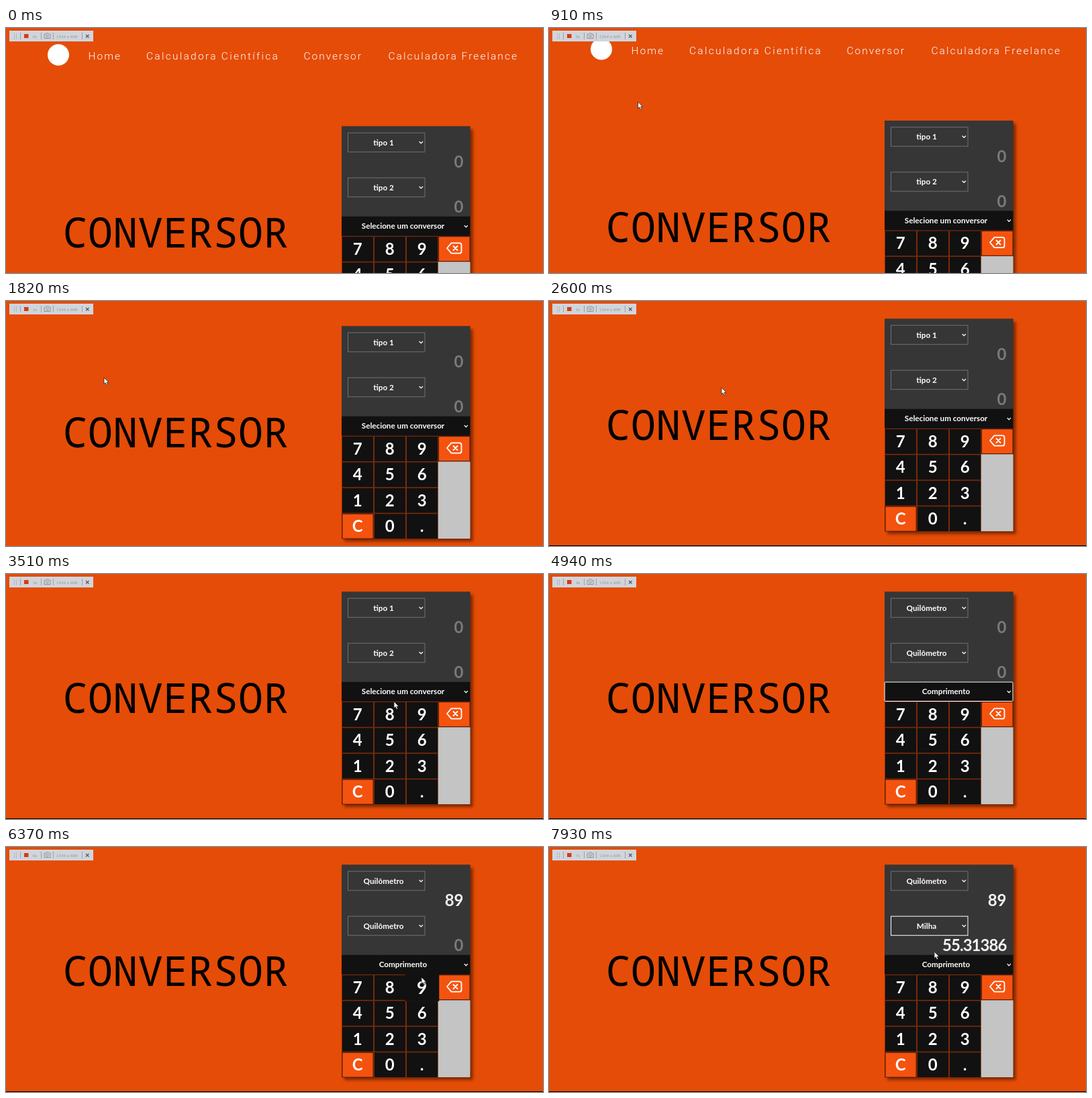
Animation, 800 px wide and 365 px high, one loop 8 s. Source, as an HTML page:

```html
<!DOCTYPE html>
<html lang="pt">
<head>
<meta charset="utf-8">
<title>Conversor</title>
<style>
  html, body { margin: 0; width: 100%; height: 100%; overflow: hidden; background: #e54c07; }
  svg { display: block; width: 800px; height: 365px; }
  text { font-family: Lato, sans-serif; font-weight: 700; fill: #fff; }
  .mid { text-anchor: middle; }
  .label { font-size: 11.7px; }
  .value { font-size: 24px; text-anchor: end; }
  .key { font-size: 24px; }
  .nav { font: 300 15.5px Roboto, sans-serif; }
  .title { font: 500 61.5px "Noto Sans Mono", "DejaVu Sans Mono", monospace; letter-spacing: .45px; fill: #000; }
  .bar text { font: 7px "Liberation Serif", serif; fill: #8d9097; }
  .line { fill: none; stroke: #fff; stroke-linecap: round; stroke-linejoin: round; }
  .shadow { filter: blur(2px); }
</style>
</head>
<body>
<svg id="stage" viewBox="0 0 800 365">
  <rect width="800" height="365" fill="#e54c07"/>
  <g id="page"></g>
  <g class="bar">
    <rect x="5" y="4" width="125" height="16" fill="#d0d5dc"/>
    <path d="M12.5 9v8M15.5 9v8" stroke="#8d9097" stroke-dasharray="1 1.5"/>
    <path d="M21.5 7v10M52.5 7v10M70.5 7v10M113.5 7v10" stroke="#9da1a8"/>
    <rect x="27" y="9" width="6.5" height="6" fill="#d93a12"/>
    <text id="clock" x="40" y="14.5">0s</text>
    <path d="M57 9.5h2l1-1.5h3l1 1.5h2v6h-9z" fill="none" stroke="#8d9097"/>
    <circle cx="61.5" cy="12.3" r="1.7" fill="none" stroke="#8d9097"/>
    <text x="75" y="14.5">1334 x 609</text>
    <path d="M119 10l4.5 4.5M123.5 10l-4.5 4.5" stroke="#55585e" stroke-width="1.2"/>
  </g>
  <path id="cursor" d="M0 0v9.8l2.2-2 1.7 3.7 1.8-.8-1.7-3.5h3.1z" fill="#fff" stroke="#222" stroke-width=".8"/>
</svg>
<script>
const LOOP = 8000, STEP = 130;
const EDGE = '#707070', ORANGE = '#f4530f';
const $ = id => document.getElementById(id);
const page = $('page');

function add(tag, attrs, parent = page) {
  const el = document.createElementNS('http://www.w3.org/2000/svg', tag);
  for (const k in attrs) el.setAttribute(k, attrs[k]);
  parent.appendChild(el);
  return el;
}
function box(x, y, width, height, fill, more, parent) {
  return add('rect', { x, y, width, height, fill, ...more }, parent);
}
function write(str, x, y, cls, parent) {
  const el = add('text', { x, y, class: cls }, parent);
  el.textContent = str;
  return el;
}

// Menu entry whose tracking fills its span
function entry(str, x, span) {
  const el = write(str, x, 47, 'nav');
  const gap = (span - el.getComputedTextLength()) / (str.length - 1);
  el.style.letterSpacing = gap + 'px';
}

// Header and title
add('circle', { cx: 78, cy: 40, r: 16, fill: '#fff' });
entry('Home', 122.5, 47.5);
entry('Calculadora Científica', 209, 195.5);
entry('Conversor', 443.5, 85.5);
entry('Calculadora Freelance', 569.5, 191.5);
write('CONVERSOR', 84.6, 327, 'title');
box(0, 484, 800, 60, '#000');

// Calculator
const chevron = (x, y) =>
  add('path', { d: `M${x - 2.3} ${y - 1.2}l2.3 2.4 2.3-2.4`, class: 'line', 'stroke-width': 1.3 });

box(504, 151, 191.5, 316, '#5a1c00', { class: 'shadow', opacity: .75 });
box(500, 146.5, 191.5, 316.5, '#7b2a0a');
box(500, 146.5, 191.5, 134.5, '#363636');

function unit(y, name) {
  const frame = box(509.5, y, 114.5, 28.5, 'none', { stroke: EDGE });
  const label = write(name, 562.5, y + 18.3, 'mid label');
  chevron(618.3, y + 14.5);
  const value = write('0', 681.5, y + 52, 'value');
  return { frame, label, value };
}
const from = unit(156.2, 'tipo 1'), to = unit(223.2, 'tipo 2');

box(500, 280.8, 191.5, 29, '#111');
const kind = write('Selecione um conversor', 591.5, 299.2, 'mid label');
chevron(685.3, 295.6);
const ring = box(500, 281, 191, 28.5, 'none', { stroke: '#fff', rx: 1 });

const dark = { stroke: '#3a1205', 'stroke-width': .8 };
box(643.8, 348.3, 47.7, 114.7, '#c4c4c4');
box(644.6, 310.8, 46.4, 36.8, ORANGE, dark);
add('path', { d: 'M657 328l6.5-7.7h12q3 0 3 3v9.4q0 3-3 3h-12z', class: 'line', 'stroke-width': 1.8 });
add('path', { d: 'M666.5 325l6 6m0-6l-6 6', class: 'line', 'stroke-width': 1.9 });

const pad = add('g', {});
const keys = [...'789456123C0.'].map((ch, i) => {
  const x = 501 + i % 3 * 48, y = 311 + Math.floor(i / 3) * 38.4;
  const el = add('g', {}, pad);
  if (ch === 'C') box(x, y, 46, 36.8, ORANGE, dark, el);
  else box(x, y, 46, 36.8, '#111', {}, el);
  write(ch, x + 22.7, y + 26.8, 'mid key', el);
  return { el, x, y };
});

// Motion: [time, values...]
const scrollPath = [[780, 0], [910, 8.5], [1300, 56], [1820, 109], [1950, 117], [2080, 120]];
const cursorPath = [
  [130, 40, 25], [780, 132, 108], [910, 132.5, 110], [1820, 146, 114], [2340, 146, 114],
  [3120, 574, 172], [3380, 576, 182], [3510, 578, 190], [4160, 578, 190], [4420, 590, 178],
  [5070, 600, 178], [5460, 574, 196], [6110, 574, 196], [6240, 616, 195], [6370, 619, 194],
  [6500, 619, 194], [6630, 612, 180], [7150, 570, 122], [7800, 574, 152], [7930, 574, 156]
];
const shown = [[130, 4420], [5070, 7280], [7800, LOOP]];

function along(path, t) {
  if (t <= path[0][0]) return path[0].slice(1);
  const i = path.findIndex(p => p[0] > t);
  if (i < 0) return path[path.length - 1].slice(1);
  const a = path[i - 1], b = path[i], u = (t - a[0]) / (b[0] - a[0]);
  const k = b[0] - a[0] > 4 * STEP ? u * u * (3 - 2 * u) : u;
  return a.slice(1).map((v, n) => v + (b[n + 1] - v) * k);
}

function setValue(el, str) {
  el.textContent = str;
  el.style.fill = str === '0' ? '#7d7a79' : '#f4f4f4';
  el.style.letterSpacing = str.length > 2 ? '-.95px' : '0px';
}

function render(ms) {
  const t = Math.floor(ms / STEP) * STEP;
  const [scroll] = along(scrollPath, t);
  const [cx, cy] = along(cursorPath, t);
  const visible = shown.some(([a, b]) => t >= a && t < b);
  const chosen = t >= 4810, converted = t >= 7800;

  page.setAttribute('transform', `translate(0 ${-scroll})`);
  $('clock').textContent = Math.floor(t / 1000) + 's';
  $('cursor').setAttribute('transform', `translate(${cx} ${cy})`);
  $('cursor').style.display = visible ? '' : 'none';

  kind.textContent = chosen ? 'Comprimento' : 'Selecione um conversor';
  from.label.textContent = chosen ? 'Quilômetro' : 'tipo 1';
  to.label.textContent = converted ? 'Milha' : chosen ? 'Quilômetro' : 'tipo 2';
  ring.style.display = chosen && t < 5850 ? '' : 'none';
  to.frame.setAttribute('stroke', converted ? '#fff' : EDGE);
  setValue(from.value, t >= 6370 ? '89' : t >= 5850 ? '8' : '0');
  setValue(to.value, converted ? '55.31386' : '0');

  for (const { el, x, y } of keys) {
    const dx = cx - x, dy = cy + scroll - y;
    const over = visible && dx > 0 && dx < 46 && dy > 0 && dy < 36.8;
    const mx = x + 23, my = y + 18.4;
    el.setAttribute('transform', over
      ? `translate(${mx} ${my}) scale(1.1) translate(${-mx} ${-my})` : '');
    if (over && pad.lastChild !== el) pad.appendChild(el);
  }
}

const start = performance.now();
function tick() {
  render((performance.now() - start) % LOOP);
  requestAnimationFrame(tick);
}
tick();
</script>
</body>
</html>
```
